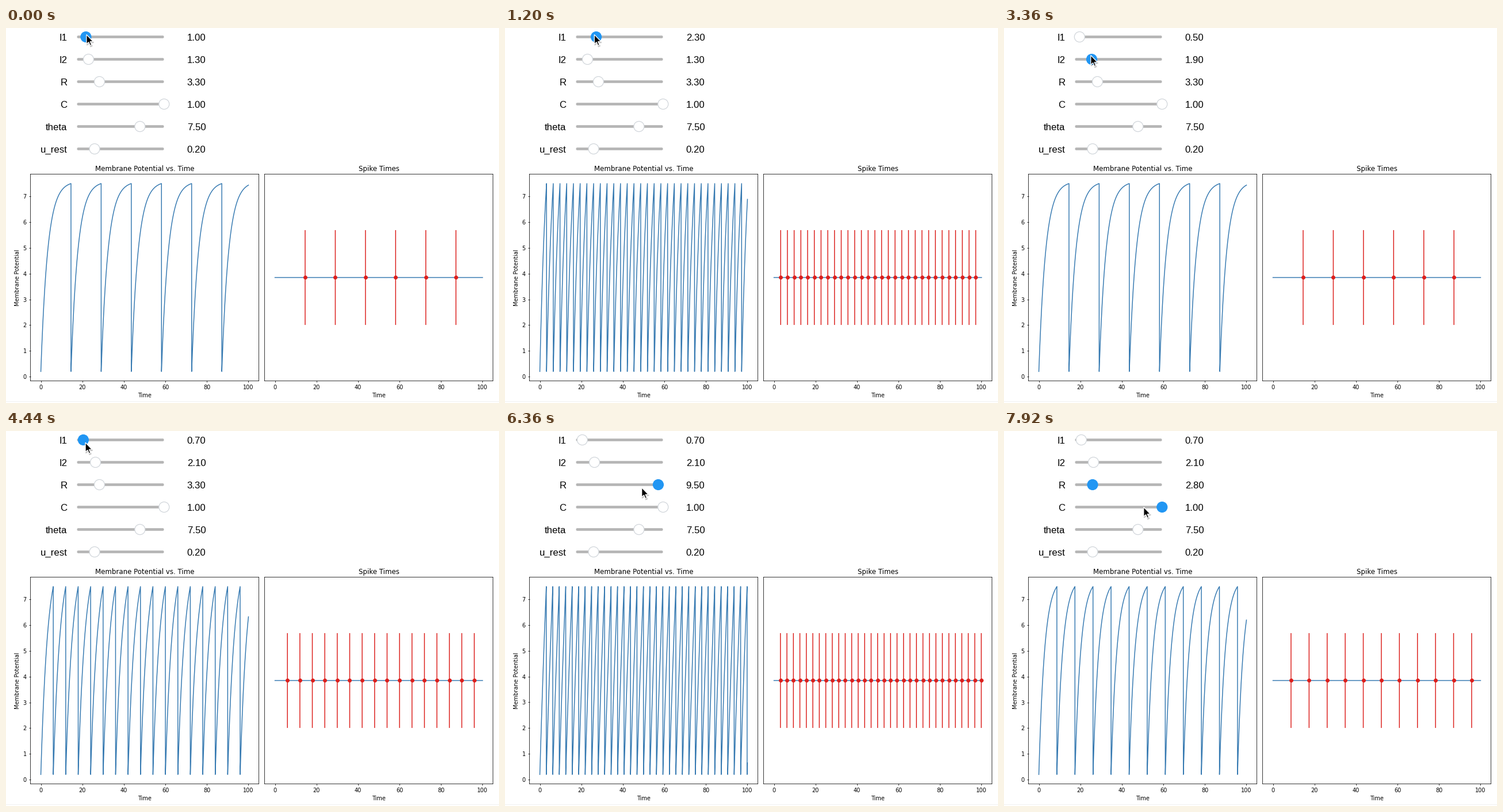
These frames come from a looping animation (857x653 px, 8000 ms). A matplotlib script:

```python
import numpy as np
import matplotlib.pyplot as plt
from matplotlib.animation import FuncAnimation
from matplotlib.patches import Circle, FancyBboxPatch, Polygon
from matplotlib.ticker import MultipleLocator

W, H, DPI = 857, 653, 70.5
PX = 72 / DPI                     # points per pixel
TICK, STEP, LOOP = 40, 120, 8000  # frame interval, picture hold, loop (ms)
LEAD, GLOW = 240, 600             # pointer runs ahead; knob stays lit after
DT = 0.01
BLUE, RED, KNOB = "#3579b1", "#dc1f1c", "#2196f3"

# name, low end, high end, first value
SLIDERS = [("I1", 0, 10, 1.0), ("I2", 0, 10, 1.3), ("R", 1, 10, 3.3),
           ("C", 0, 1, 1.0), ("theta", 1, 10, 7.5), ("u_rest", 0, 1, 0.2)]

# slider, start, end, new value, pointer offset from the knob
DRAGS = [(0, 240, 1080, 2.3, (1, -4)),
         (0, 1200, 2160, 0.5, (1, -4)),
         (1, 2520, 3780, 2.1, (-4, -7)),
         (0, 4200, 4500, 0.7, (3, 0)),
         (2, 5760, 6360, 9.5, (-13, 5)),
         (2, 6360, 7380, 2.8, (-13, 5)),
         (3, 8040, 8160, 1.0, (-32, 0))]

ARROW = np.array([(0, 0), (0, 16.6), (3.8, 13.1), (6.4, 19.1), (8.9, 18),
                  (6.4, 12.1), (11.6, 12.1)])


def ease(t, start, end):
    p = np.clip((t - start) / max(end - start, 1), 0, 1)
    return p * p * (3 - 2 * p)


def row(i):
    return 15.5 + 39 * i


def value(i, t):
    v = SLIDERS[i][3]
    for slider, start, end, goal, _ in DRAGS:
        if slider == i:
            v += (goal - v) * ease(t, start, end)
    return v


def settings(t):
    return [round(float(value(i, t)), 1) for i in range(len(SLIDERS))]


def knob_x(i, v):
    _, low, high, _ = SLIDERS[i]
    return 123.8 + 151 * (v - low) / (high - low)


def is_lit(i, t):
    return any(s == i and start - LEAD <= t < end + GLOW
               for s, start, end, *_ in DRAGS)


def pointer(t):
    """Follow the held knob, then glide over to the next one."""
    t += LEAD

    def grip(drag):
        i, offset = drag[0], drag[4]
        return np.array([knob_x(i, value(i, t)), row(i)]) + offset

    k = max(n for n, drag in enumerate(DRAGS) if drag[1] <= t)
    now, after = DRAGS[k], DRAGS[min(k + 1, len(DRAGS) - 1)]
    glide = ease(t, now[2], after[1])
    return grip(now) * (1 - glide) + grip(after) * glide


def simulate(i1, i2, r, c, theta, rest):
    """Leaky integrate-and-fire neuron: potential and spike times."""
    k = np.arange(int(100 / DT) + 1)
    top, decay = r * (i1 + i2), 1 - DT / (r * c)
    phase, spikes = k, np.array([])
    if top > theta:
        n = int(np.ceil(np.log((top - theta) / (top - rest)) / np.log(decay)))
        phase, spikes = k % n, k[n::n] * DT
    return k * DT, top - (top - rest) * decay ** phase, spikes


plt.rcParams["font.family"] = "DejaVu Sans"
fig = plt.figure(figsize=((W + 1e-6) / DPI, (H + 1e-6) / DPI), dpi=DPI,
                 facecolor="white")


def add_axes(x, y, w, h):
    return fig.add_axes([x / W, 1 - (y + h) / H, w / W, h / H])


def add_plot(x, title):
    ax = add_axes(x, 254.5, 397, 360)
    ax.set_title(title)
    ax.set_xlabel("Time")
    ax.set_xlim(-5, 105)
    ax.xaxis.set_major_locator(MultipleLocator(20))
    for spine in ax.spines.values():
        spine.set_snap(False)
    return ax


left = add_plot(42.5, "Membrane Potential vs. Time")
left.set_ylabel("Membrane Potential")
left.yaxis.set_major_locator(MultipleLocator(1))
curve, = left.plot([], [], color=BLUE, lw=1.5)

right = add_plot(449.5, "Spike Times")
right.set_yticks([])
right.set_ylim(-1.1, 1.1)
right.plot([0, 100], [0, 0], color=BLUE, lw=1.5, snap=False)
stems, = right.plot([], [], color=RED, lw=1.5, snap=False)
dots, = right.plot([], [], "o", color=RED, ms=6, snap=False)

ui = add_axes(0, 0, W, H)
ui.set_xlim(0, W)
ui.set_ylim(H, 0)
ui.axis("off")
ui.plot([0, W], [650.5, 650.5], color="#f1f1f1", lw=PX)

knobs, readouts = [], []
for i, (name, *_) in enumerate(SLIDERS):
    y = row(i)
    font = dict(family="Liberation Sans", size=16.7 * PX, va="baseline")
    ui.text(106.5, y + 6.7, name, ha="right", **font)
    readouts.append(ui.text(331, y + 6.7, "", ha="center", **font))
    ui.add_patch(FancyBboxPatch((125.5, y - 0.3), 147, 0.6, fc="#b5b5b5",
                                ec="none", snap=False,
                                boxstyle="round,pad=2,rounding_size=2"))
    knobs.append(ui.add_patch(Circle((0, y), 9, lw=1.2 * PX, zorder=3)))

shadow = ui.add_patch(Polygon(ARROW, fc="black", ec="black", lw=2 * PX,
                              alpha=0.16, zorder=4))
arrow = ui.add_patch(Polygon(ARROW, fc="black", ec="white", lw=1.3 * PX,
                             joinstyle="miter", zorder=5))


def draw(frame):
    t = frame * TICK // STEP * STEP
    for i, v in enumerate(settings(t)):
        lit = is_lit(i, t)
        knobs[i].center = knob_x(i, v), row(i)
        knobs[i].set_facecolor(KNOB if lit else "white")
        knobs[i].set_edgecolor(KNOB if lit else "#d0d5da")
        readouts[i].set_text(f"{v:.2f}")

    # the plots trail the sliders by one step
    time, u, spikes = simulate(*settings(max(0, t - STEP)))
    curve.set_data(time, u)
    pad = 0.05 * (u.max() - u.min())
    left.set_ylim(u.min() - pad, u.max() + pad)
    stems.set_data(np.repeat(spikes, 3),
                   np.tile([-0.5, 0.5, np.nan], len(spikes)))
    dots.set_data(spikes, np.zeros(len(spikes)))

    tip = pointer(t)
    arrow.set_xy(ARROW + tip)
    shadow.set_xy(ARROW + tip + (0.8, 1.8))
    return [curve, stems, dots, arrow, shadow, *knobs, *readouts]


anim = FuncAnimation(fig, draw, frames=LOOP // TICK, interval=TICK,
                     repeat=True, repeat_delay=0, init_func=lambda: draw(0))
plt.show()
```
